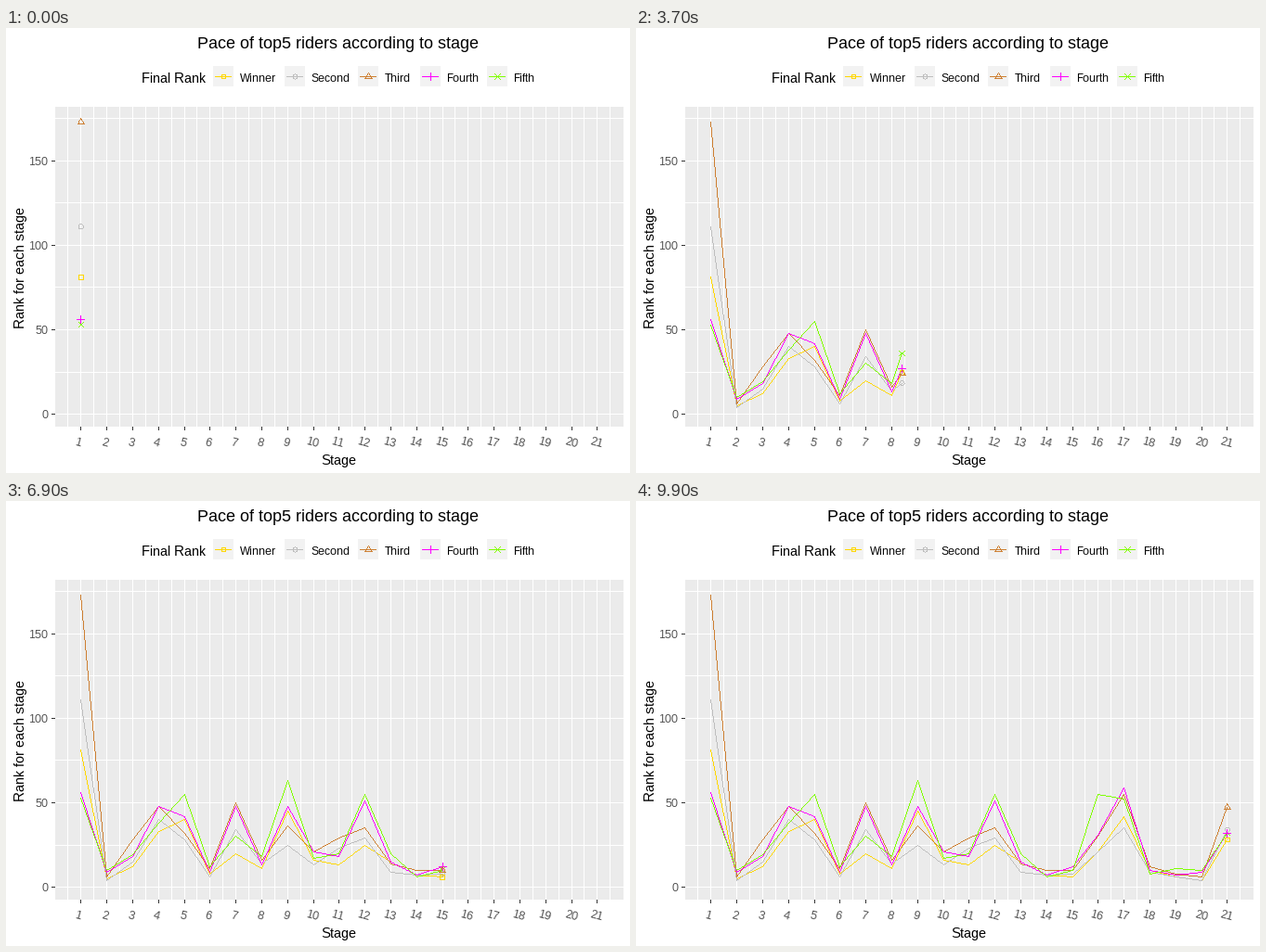
Write a matplotlib script that moves like this. It is 672 px wide and 480 px high and loops after 10 s.

```python
import numpy as np
import matplotlib.pyplot as plt
from matplotlib.animation import FuncAnimation

W, H, DPI = 672, 480, 96
PX = 72 / DPI          # one pixel in points
FRAMES, INTERVAL = 100, 100
LEFT, RIGHT, TOP, BOTTOM = 53, 665, 85, 430
WHITE, PANEL, KEY, TICK = "#FFFFFF", "#EBEBEB", "#F2F2F2", "#333333"

plt.rcParams.update({
    "font.family": "Liberation Sans",
    "text.hinting": "native",
    "text.hinting_factor": 1,
})


def spokes(n, r, start=0):
    """n points on a circle of radius r, closed."""
    a = np.radians(start + 360 / n * np.arange(n + 1))
    return np.column_stack([r * np.cos(a), r * np.sin(a)])


def crossed(r, start):
    return [spokes(2, r, start)[:2], spokes(2, r, start + 90)[:2]]


# one outline, or two bars, per marker
square = [spokes(4, 3.4, 45)]
circle = [spokes(16, 2.6)]
triangle = [spokes(3, 4.05, -90)]
plus, cross = crossed(4, 0), crossed(3.7, 45)

# colour, marker, legend key edge, opening rank, gain, swing, period, peak stage
riders = {
    "Winner": ("#FFD700", square, 223, 81, 0.81, 0.25, 4.3, 5),
    "Second": ("#BEBEBE", circle, 300, 111, 0.79, 0.24, 3.5, 4),
    "Third": ("#CD7F32", triangle, 379, 173, 1.10, 0.28, 3.6, 7),
    "Fourth": ("#FF00FF", plus, 446, 56, 1.08, 0.25, 2.6, 7),
    "Fifth": ("#7FFF00", cross, 518, 53, 1.15, 0.33, 3.6, 16),
}
point_order = ["Fifth", "Second", "Winner", "Fourth", "Third"]

# pace of the whole group from stage 2 on; every rider swings around it
stages = np.arange(1, 22)
pace = np.array([7, 21, 39, 38, 10, 36, 15, 43, 17, 22,
                 39, 15, 7, 9, 37, 48, 9, 8, 7, 36])


def rank_curve(opening, gain, swing, period, peak):
    wave = np.cos(2 * np.pi * (stages[1:] - peak) / period)
    return np.append(opening, np.maximum(1, np.round(pace * (gain + swing * wave))))


ranks = {name: rank_curve(*spec[3:]) for name, spec in riders.items()}


def x_px(stage):
    return 53 + 27.803 * np.asarray(stage, float)


def y_px(rank):
    return 416.6 - 1.8225 * np.asarray(rank, float)


def rgb(color):
    return [int(color[i:i + 2], 16) for i in (1, 3, 5)]


def fill(img, x0, y0, x1, y1, color):
    img[y0:y1, x0:x1] = rgb(color)


def stroke(img, points, color):
    """Hard-edged polyline, one pixel wide."""
    pts = np.floor(points).astype(int)
    for a, b in zip(pts[:-1], pts[1:]):
        n = np.abs(b - a).max() + 1
        x, y = np.rint(np.linspace(a, b, n)).astype(int).T
        img[y, x] = rgb(color)


def mark(img, x, y, name):
    color, shape = riders[name][:2]
    for part in shape:
        stroke(img, part + [x, y], color)


fig = plt.figure(figsize=(W / DPI, H / DPI), dpi=DPI, facecolor="white")
ax = fig.add_axes([0, 0, 1, 1])
ax.axis("off")


def label(x, y, text, size, color="black", ha="left", va="baseline", angle=0):
    ax.text(x, y, text, fontsize=size * PX, color=color, ha=ha, va=va,
            rotation=angle, rotation_mode="anchor")


# panel, grid and axes
base = np.full((H, W, 3), 255, np.uint8)
fill(base, LEFT, TOP, RIGHT, BOTTOM, PANEL)
for x in x_px(np.arange(0.5, 22, 0.5)).astype(int):
    fill(base, x, TOP, x + 1, BOTTOM, WHITE)
for y in y_px(np.arange(0, 200, 25)).astype(int):
    fill(base, LEFT, y, RIGHT, y + 1, WHITE)
for r in range(0, 200, 50):
    y = int(y_px(r))
    fill(base, LEFT - 4, y, LEFT, y + 1, TICK)
    label(45.5, y + 5, str(r), 12, "#4D4D4D", ha="right")
for s in stages:
    x = int(x_px(s))
    fill(base, x, BOTTOM, x + 1, BOTTOM + 4, TICK)
    shift = 1.5 if s < 10 else 0.2
    label(x - shift, 447.5, str(s), 12, "#4D4D4D", "center", "center", -15)

# titles
label(357.5, 22, "Pace of top5 riders according to stage", 18, ha="center")
label(358, 471, "Stage", 15, ha="center")
label(20, 258, "Rank for each stage", 15, ha="center", angle=90)

# legend
label(146, 59, "Final Rank", 15)
for name, (color, _, key, *_) in riders.items():
    fill(base, key, 41, key + 22, 63, KEY)
    fill(base, key + 2, 52, key + 20, 53, color)
    mark(base, key + 11.5, 52.5, name)
    label(key + 28.5, 58, name, 12)

picture = ax.imshow(base, extent=(0, W, H, 0), aspect="auto",
                    interpolation="nearest")


def update(frame):
    # the reveal moves on a grid of 0.2 stages
    now = 1 + round(100 * frame / (FRAMES - 1)) / 5
    done = stages[stages < now]
    img = base.copy()
    tips = {}
    for name, values in ranks.items():
        xs = x_px(np.append(done, now))
        ys = y_px(np.append(values[:len(done)], np.interp(now, stages, values)))
        stroke(img, np.column_stack([xs, ys]), riders[name][0])
        tips[name] = xs[-1], ys[-1]
    for name in point_order:
        mark(img, *tips[name], name)
    picture.set_data(img)
    return [picture]


anim = FuncAnimation(fig, update, frames=FRAMES, interval=INTERVAL,
                     repeat=True, repeat_delay=0, blit=False)
plt.show()
```
